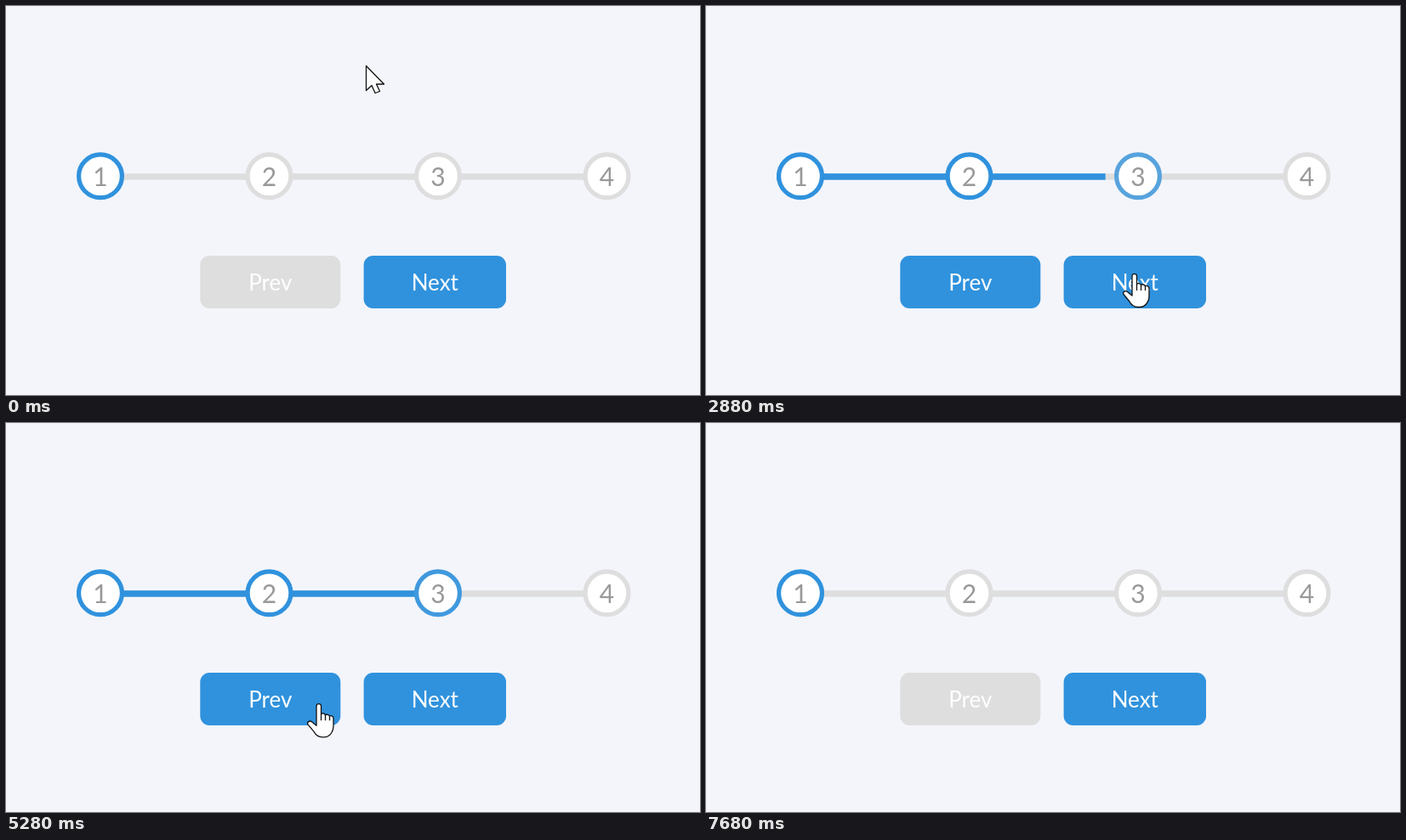
Write an HTML page that moves like this. It is 816 px wide and 458 px high and loops after 7760 ms.

```html
<!DOCTYPE html>
<html lang="en">
<head>
<meta charset="utf-8">
<title>Progress steps</title>
<style>
  html, body { margin: 0; width: 100%; height: 100%; overflow: hidden; background: #f3f5fb; }
  svg { display: block; width: 816px; height: 458px; }
  text { font-family: Lato, "Open Sans", sans-serif; text-anchor: middle; }
</style>
</head>
<body>
<svg id="stage" viewBox="0 0 816 458"></svg>
<script>
const LOOP = 7760, TICK = 80, FADE = 400, PRESS = 120;
const BLUE = [48, 146, 221], GREY = [222, 222, 222];
const BAR = { left: 83, width: 653 };

// Each click moves the progress to a level from 1 to 4.
const clicks = [
  { at: 1990, level: 2, button: 'next' },
  { at: 2690, level: 3, button: 'next' },
  { at: 3380, level: 4, button: 'next' },
  { at: 4640, level: 3, button: 'prev' },
  { at: 5240, level: 2, button: 'prev' },
  { at: 5850, level: 1, button: 'prev' }
];

// Pointer stops: time, x, y
const route = [
  [0, 423, 70], [720, 342, 322], [1040, 352, 328], [1360, 452, 344], [1600, 503, 316],
  [4000, 503, 316], [4400, 367, 331.5], [6400, 367, 331], [6960, 425, 98]
];
const POINTER_GONE = 7120;

const stage = document.getElementById('stage');

function add(tag, attrs, parent = stage) {
  const node = document.createElementNS('http://www.w3.org/2000/svg', tag);
  set(node, attrs);
  parent.appendChild(node);
  return node;
}

function set(node, attrs) {
  for (const key in attrs) node.setAttribute(key, attrs[key]);
}

const rgb = c => `rgb(${c.map(Math.round).join()})`;
const mix = (a, b, k) => a + (b - a) * k;
const mixColor = (a, b, k) => rgb(a.map((v, i) => mix(v, b[i], k)));
const smooth = k => k * k * (3 - 2 * k);

// cubic-bezier(.25, .1, .25, 1)
function ease(x) {
  if (x <= 0) return 0;
  if (x >= 1) return 1;
  const curve = (s, a, b) => 3 * (1 - s) ** 2 * s * a + 3 * (1 - s) * s * s * b + s ** 3;
  let low = 0, high = 1;
  for (let i = 0; i < 24; i++) {
    const mid = (low + high) / 2;
    if (curve(mid, .25, .25) < x) low = mid; else high = mid;
  }
  return curve(low, .1, 1);
}

const barBox = { x: BAR.left, y: 197.2, height: 7.5 };
add('rect', { ...barBox, width: BAR.width - 4, fill: rgb(GREY) });
const bar = add('rect', { ...barBox, fill: rgb(BLUE) });

const rings = [1, 2, 3, 4].map((label, i) => {
  const cx = 111 + i * 198.5;
  const ring = add('circle', { cx, cy: 200.3, r: 25.4, fill: '#fff', 'stroke-width': 5.2 });
  add('text', { x: cx, y: 212, 'font-size': 30, fill: '#999' }).textContent = label;
  return ring;
});

function makeButton(label, x, width) {
  const group = add('g', {});
  const face = add('rect', { x, y: 294, width, height: 62, rx: 11 }, group);
  add('text', { x: x + width / 2, y: 334.5, 'font-size': 26, fill: '#fff' }, group).textContent = label;
  return { group, face, x, width, cx: x + width / 2, cy: 325 };
}

const buttons = {
  prev: makeButton('Prev', 228.3, 165),
  next: makeButton('Next', 420.6, 167.4)
};

const outline = { fill: '#fff', stroke: '#111', 'stroke-width': 1.3, 'stroke-linejoin': 'round' };
const pointers = { arrow: add('g', {}), hand: add('g', {}), blocked: add('g', {}) };
add('path', { ...outline, d: 'M.5 .5V29.5L7 23.5 11 32.5 16.5 30.5 12.5 22H21.5Z' }, pointers.arrow);
add('path', {
  ...outline,
  d: 'M-2 2C-2-1.5 3.5-1.5 3.5 2V12C4 10 8 10 8.5 13 9 11.5 13 11.5 13.5 14 14 13 18 13 18 16.5' +
     'V25C18 33 13 38.5 7 38.5H5C0 38.5-3 36-5 32L-12 23.5C-13.5 21-10 18.5-7.5 20.5L-2 25Z' +
     'M3.5 12V19M8.5 13V19M13.5 14V19'
}, pointers.hand);
const sign = { stroke: '#e3170a', 'stroke-width': 4 };
add('circle', { ...sign, r: 13, fill: '#fff' }, pointers.blocked);
add('path', { ...sign, d: 'M-9-9L9 9' }, pointers.blocked);

function pointerAt(t) {
  const i = route.findIndex(stop => stop[0] > t);
  if (i < 0) return route[route.length - 1].slice(1);
  const [t0, x0, y0] = route[i - 1], [t1, x1, y1] = route[i];
  const k = smooth((t - t0) / (t1 - t0));
  return [mix(x0, x1, k), mix(y0, y1, k)];
}

function draw(t) {
  const past = clicks.filter(c => c.at <= t);
  const last = past[past.length - 1];
  const level = last ? last.level : 1;
  const before = past.length > 1 ? past[past.length - 2].level : 1;
  const k = last ? ease((t - last.at) / FADE) : 1;

  bar.setAttribute('width', BAR.width * (mix(before, level, k) - 1) / 3);
  rings.forEach((ring, i) => {
    const blue = mix(i < before ? 1 : 0, i < level ? 1 : 0, k);
    ring.setAttribute('stroke', mixColor(GREY, BLUE, blue));
  });

  const disabled = { prev: level === 1, next: level === 4 };
  const [x, y] = pointerAt(t);
  let kind = 'arrow';
  for (const name in buttons) {
    const b = buttons[name];
    const pressed = clicks.some(c => c.button === name && t >= c.at - PRESS && t < c.at);
    const scale = pressed ? .98 : 1;
    set(b.group, { transform: `translate(${b.cx} ${b.cy}) scale(${scale}) translate(${-b.cx} ${-b.cy})` });
    set(b.face, { fill: rgb(disabled[name] ? GREY : BLUE) });
    if (Math.abs(x - b.cx) < b.width / 2 && Math.abs(y - b.cy) < 31) {
      kind = disabled[name] ? 'blocked' : 'hand';
    }
  }

  for (const name in pointers) {
    const visible = name === kind && t < POINTER_GONE;
    set(pointers[name], {
      transform: `translate(${x} ${y})`,
      visibility: visible ? 'visible' : 'hidden'
    });
  }
}

const start = performance.now();
function frame() {
  const t = (performance.now() - start) % LOOP;
  draw(Math.floor(t / TICK) * TICK);
  requestAnimationFrame(frame);
}
frame();
</script>
</body>
</html>
```
